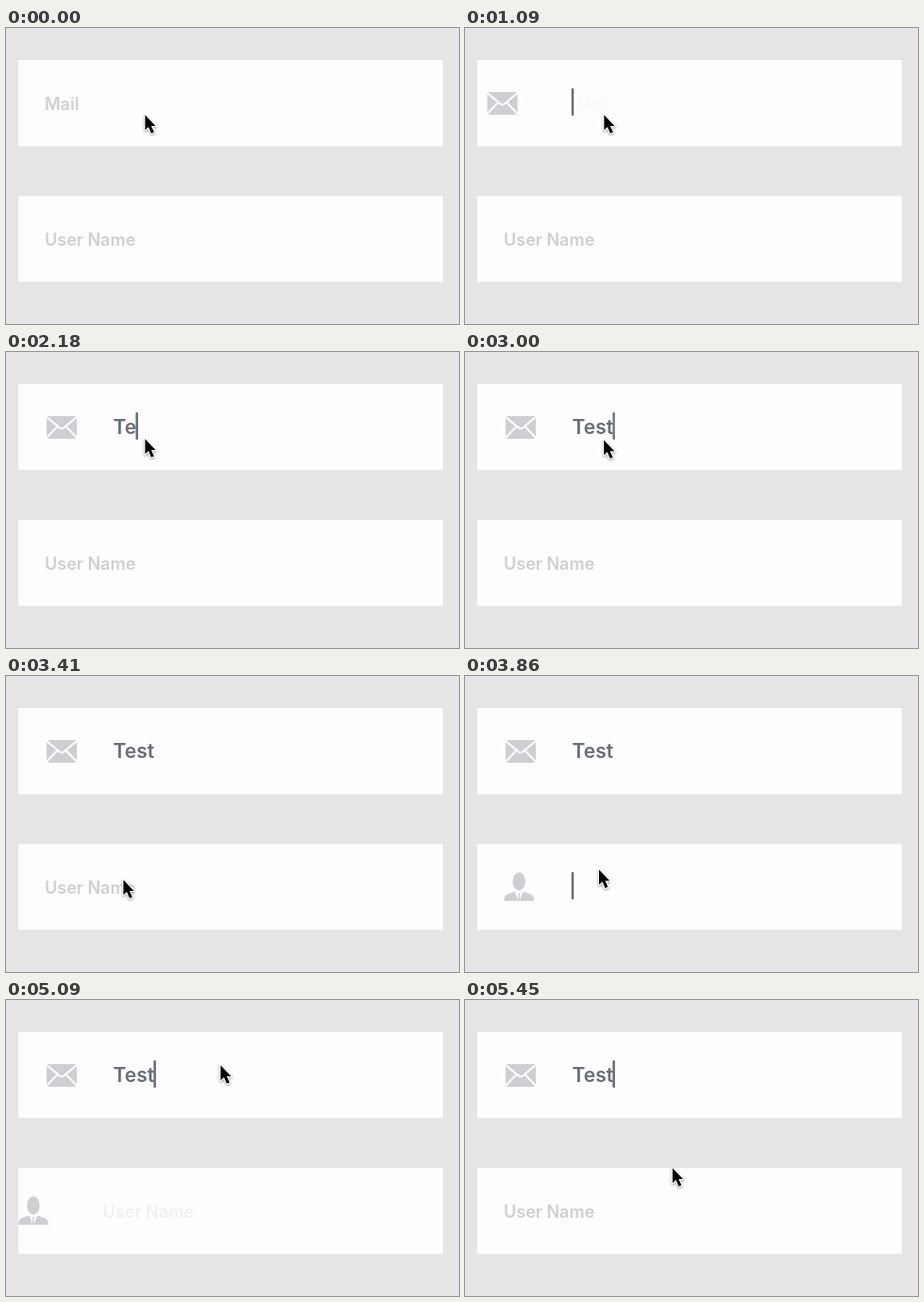
Write an HTML page that moves like this. It is 480 px wide and 314 px high and loops after 5490 ms.

```html
<!DOCTYPE html>
<html lang="en">
<head>
<meta charset="utf-8">
<title>Sliding icon inputs</title>
<style>
html, body { margin: 0; height: 100%; overflow: hidden; background: #e6e4e7; }
svg { display: block; }
text { font-family: Inter, "Open Sans", sans-serif; font-weight: 600; }
.label { font-size: 18px; fill: #cfced3; }
.value { font-size: 21px; fill: #666d78; }
.icon { fill: #cfced3; }
.cut { fill: none; stroke: #fffdff; stroke-width: 2; }
.caret { fill: #656c78; }
#pointer { stroke: #fff; stroke-width: 2.4; stroke-linejoin: round; paint-order: stroke;
  filter: drop-shadow(0 1.5px 1.2px #0006); }
</style>
</head>
<body>
<svg id="stage" width="480" height="314"></svg>
<script>
const LOOP = 5490, FPS = 22, SLIDE = 300;
const ICON_SHIFT = 75, LABEL_SHIFT = 103;
const MAIL_FOCUS = 1034, USER_FOCUS = 3714, USER_BLUR = 5065;

const mailIcon = `<rect y="34" width="32" height="24" rx="1.5"/>
  <path class="cut" d="M-.5 34.5L14 46.6Q16 48 18 46.6L32.5 34.5M-.5 57.5L11 45.5M32.5 57.5L21 45.5"/>`;
const userIcon = `<ellipse cx="16" cy="40" rx="6.7" ry="9.7"/>
  <path d="M0 60.5Q0 54.5 5 53L11.5 50.5L15 59.5L15.5 54.5L14.5 52.5H17.5L16.5 54.5L17 59.5L20.5 50.5L27 53Q32 54.5 32 60.5Z"/>`;

const field = (y, icon, label) => `<svg class="field" x="13" y="${y}" width="450" height="91.5">
  <rect width="450" height="91.5" fill="#fffdff"/>
  <g class="icon">${icon}</g>
  <text class="label" y="52.5">${label}</text>
  <text class="value" x="100.5" y="52.5"></text>
  <rect class="caret" y="30" width="2.5" height="29" rx="1"/></svg>`;

const stage = document.getElementById("stage");
stage.innerHTML = field(34, mailIcon, "Mail") + field(178, userIcon, "User Name") +
  `<path id="pointer" d="M0 0V16L3.6 12.6L6.5 19.5L9.5 18.2L6.5 11.7H11.2Z"/>`;
const [mail, user] = stage.querySelectorAll(".field");
const pointer = document.getElementById("pointer");

// Pointer moves: start, end, x, y
const home = [147.4, 92.3];
const moves = [
  [2975, 3410, 124.4, 216.3],
  [3545, 3700, 153, 190],
  [3700, 3990, 134, 217],
  [4165, 4575, 227.4, 69.3],
  [5290, 5570, 215, 249]
];
const keys = [1910, 2180, 2410, 2550];

const ramp = (t, start, length) => Math.min(1, Math.max(0, (t - start) / length));
const smooth = f => f * f * (3 - 2 * f);

// cubic-bezier(.2, 1, .2, 1)
function ease(x) {
  let lo = 0, hi = 1;
  for (let i = 0; i < 24; i++) {
    const s = (lo + hi) / 2;
    if (.6 * s * (1 - s) + s ** 3 < x) lo = s; else hi = s;
  }
  return 3 * lo * (1 - lo) + lo ** 3;
}
const slide = (t, start) => ease(ramp(t, start, SLIDE));

function pointerAt(t) {
  return moves.reduce(([x, y], [start, end, toX, toY]) => {
    const f = smooth(ramp(t, start, end - start));
    return [x + (toX - x) * f, y + (toY - y) * f];
  }, home);
}

function drawField(el, focus, value, caret) {
  const set = (name, attrs) => {
    for (const key in attrs) el.querySelector(name).setAttribute(key, attrs[key]);
  };
  const text = el.querySelector(".value");
  text.textContent = value;
  set(".icon", { transform: `translate(${30 - ICON_SHIFT * (1 - focus)})` });
  set(".label", { x: 28 + LABEL_SHIFT * focus, opacity: Math.max(0, 1 - 1.2 * focus) });
  set(".caret", { x: 99.8 + text.getComputedTextLength(), opacity: caret });
}

const fadeOut = (t, start) => 1 - ramp(t, start, 180);

function mailCaret(t) {
  if (t < MAIL_FOCUS) return 0;
  if (t < keys[0]) return fadeOut(t, 1690);
  return t < USER_BLUR ? fadeOut(t, 2985) : 1;
}
function userCaret(t) {
  if (t < USER_FOCUS || t > USER_BLUR) return 0;
  return fadeOut(t, 4370) + ramp(t, 4780, 180);
}

// Hold each picture for one frame of the 22 fps clock
function snap(t) {
  const start = n => Math.round(n * 100 / FPS) * 10;
  const n = Math.floor((t + 5) * FPS / 1000);
  return start(n) > t ? start(n - 1) : start(n);
}

function draw(now) {
  const t = snap(now % LOOP);
  const typed = "Test".slice(0, keys.filter(k => k <= t).length);
  drawField(mail, slide(t, MAIL_FOCUS), typed, mailCaret(t));
  drawField(user, slide(t, USER_FOCUS) - slide(t, USER_BLUR), "", userCaret(t));
  pointer.setAttribute("transform", `translate(${pointerAt(t)})`);
}

let begin;
function tick(now) {
  begin ??= now;
  draw(now - begin);
  requestAnimationFrame(tick);
}
draw(0);
requestAnimationFrame(tick);
</script>
</body>
</html>
```
